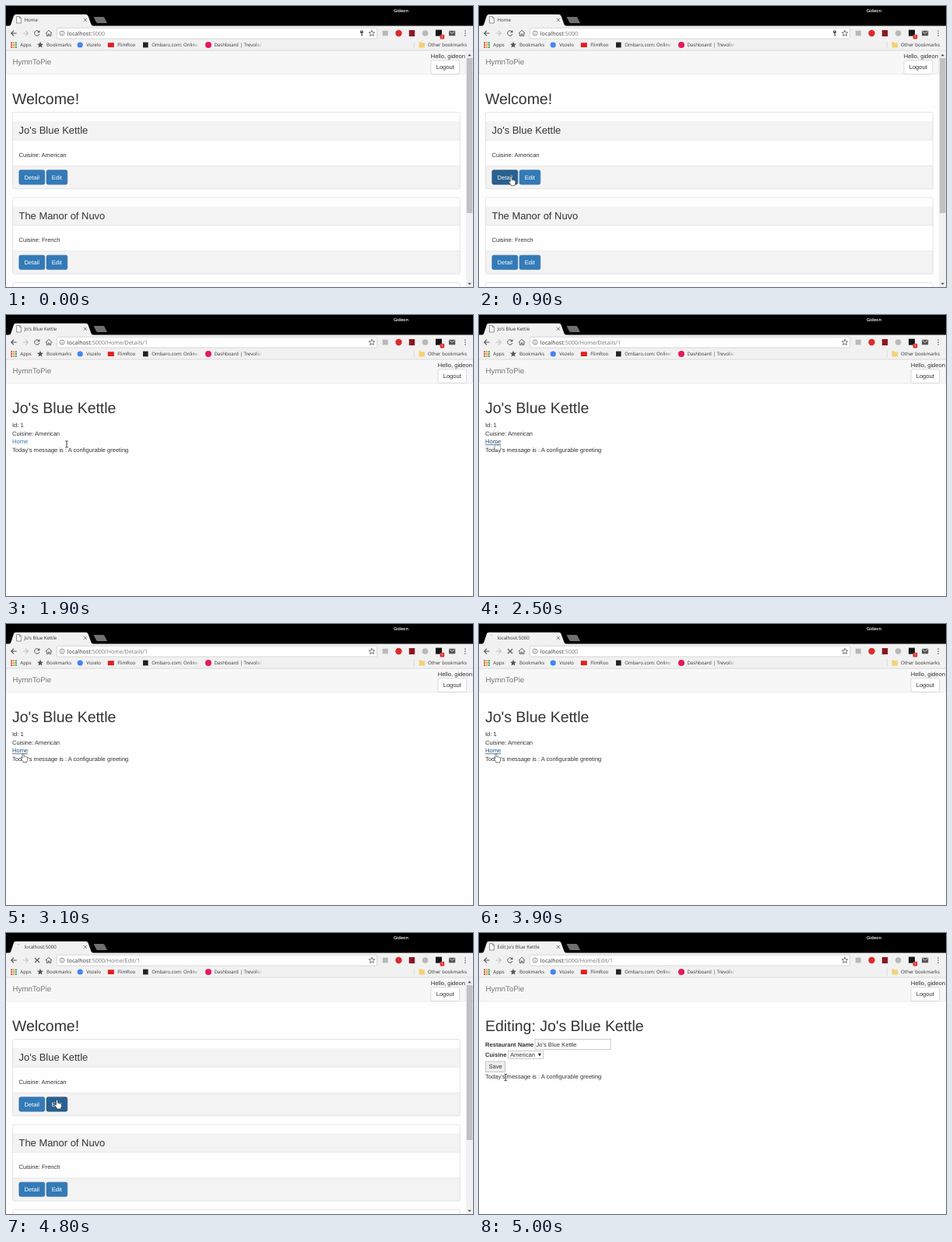
Recreate the animation shown at these times as an HTML page. Size 600 by 361 pixels, loop 5.1 s.

```html
<!DOCTYPE html>
<html lang="en">
<head>
<meta charset="utf-8">
<title>Restaurant list</title>
<style>
  html, body { margin: 0; width: 100%; height: 100%; overflow: hidden; background: #fefefe; }
  svg { display: block; width: 600px; height: 361px; text-rendering: geometricPrecision; }
  text { font-family: "Liberation Sans", Arial, sans-serif; font-size: 7.58px; fill: #333; }
  .ui { font-family: "Open Sans", "Noto Sans", sans-serif; font-size: 6.12px; fill: #333; }
  .url { font-size: 7.16px; }
  .user { font-size: 5.5px; font-weight: 600; fill: #fff; }
  .badge { font-size: 4.6px; fill: #fff; }
  .h1 { font-size: 19.45px; }
  .h3 { font-size: 12.95px; }
  .brand { font-size: 9.72px; fill: #777; }
  .bold { font-weight: bold; }
  .btn rect { fill: #337ab7; stroke: #2e6da4; stroke-width: .6; }
  .btn text { fill: #fff; }
  .btn.on rect { fill: #286090; stroke: #204d74; }
  .link { fill: #337ab7; }
  .link.on { fill: #23527c; text-decoration: underline; }
</style>
</head>
<body>
<svg id="stage" viewBox="0 0 600 361"></svg>
<script>
const LOOP = 5100, TICK = 100;
const PLACE = "Jo's Blue Kettle";
const BAR = "#f2f1f2", SOFT = "#f4f3f4";
const stage = document.getElementById("stage");

function add(parent, tag, attrs = {}, content) {
  const el = document.createElementNS("http://www.w3.org/2000/svg", tag);
  for (const key in attrs) el.setAttribute(key, attrs[key]);
  if (content !== undefined) el.textContent = content;
  return parent.appendChild(el);
}
const group = (parent, cls = "") => add(parent, "g", { class: cls });
const label = (p, x, y, str, cls = "") => add(p, "text", { x, y, class: cls }, str);
const box = (p, x, y, width, height, fill, more = {}) =>
  add(p, "rect", { x, y, width, height, fill, ...more });
const dot = (p, cx, cy, r, fill) => add(p, "circle", { cx, cy, r, fill });
const shape = (p, d, fill, more = {}) => add(p, "path", { d, fill, ...more });
const line = (p, d, stroke = "#555", width = 1) =>
  shape(p, d, "none", { stroke, "stroke-width": width });
const show = (el, on) => el.setAttribute("display", on ? "inline" : "none");

function star(p, cx, cy, size, fill, more = {}) {
  const points = Array.from({ length: 10 }, (_, i) => {
    const r = i % 2 ? size * .45 : size, a = Math.PI * (i / 5 - .5);
    return `${cx + r * Math.cos(a)},${cy + r * Math.sin(a)}`;
  }).join(" ");
  return add(p, "polygon", { points, fill, ...more });
}

function button(p, x, y, w, str) {
  const g = group(p, "btn");
  box(g, x, y, w, 18.4, "", { rx: 2 });
  label(g, x + 6.8, y + 12, str);
  return g;
}

// Page area
const pages = { home: group(stage), details: group(stage), edit: group(stage) };

function navbar(p, right) {
  box(p, 0, 56, 600, 305, "#fefefe");
  box(p, .3, 57.3, right - .6, 30.4, "#f8f7f8", { rx: 2, stroke: "#e2e2e2", "stroke-width": .6 });
  label(p, 8.5, 75.2, "HymnToPie", "brand");
  label(p, right - 45.3, 66.6, "Hello, gideon");
  box(p, right - 45, 69.7, 36.6, 17.7, "#fff", { rx: 2, stroke: "#ccc", "stroke-width": .7 });
  label(p, right - 38.3, 81.1, "Logout");
}

function panel(p, y, name, cuisine) {
  box(p, 8.6, y, 574.6, 98.2, "#fefefe", { rx: 2 });
  box(p, 8.6, y + 11.5, 574.6, 24.2, SOFT);
  box(p, 8.6, y + 68.8, 574.6, 29.4, SOFT, { rx: 2 });
  line(p, `M8.6 ${y + 35.7}H583.2M8.6 ${y + 68.8}H583.2`, "#ddd", .6);
  box(p, 8.6, y, 574.6, 98.2, "none", { rx: 2, stroke: "#d9d9d9", "stroke-width": .7 });
  label(p, 16.5, y + 27.7, name, "h3");
  label(p, 16.5, y + 57.4, "Cuisine: " + cuisine);
  return [button(p, 16.8, y + 74.2, 33, "Detail"), button(p, 52, y + 74.2, 26.8, "Edit")];
}

navbar(pages.home, 591);
label(pages.home, 8, 126, "Welcome!", "h1");
const [detailBtn, editBtn] = panel(pages.home, 136.6, PLACE, "American");
panel(pages.home, 246, "The Manor of Nuvo", "French");
panel(pages.home, 355.4, "", "");
box(pages.home, 591, 57.5, 9, 303.5, "#f1f1f1");
box(pages.home, 591.8, 67, 7.6, 199, "#c1c1c1");
shape(pages.home, "M593.3 64.3h4.6l-2.3-2.6z", "#555");
shape(pages.home, "M593.3 355.7h4.6l-2.3 2.6z", "#555");

const MESSAGE = "Today's message is : A configurable greeting";
navbar(pages.details, 600);
label(pages.details, 8, 126, PLACE, "h1");
label(pages.details, 8, 144, "Id: 1");
label(pages.details, 8, 154.6, "Cuisine: American");
const homeLink = label(pages.details, 8, 165.4, "Home", "link");
label(pages.details, 8, 176.1, MESSAGE);

const form = pages.edit;
const field = { stroke: "#b4b4b4", "stroke-width": .7 };
navbar(form, 600);
label(form, 8, 126, "Editing: " + PLACE, "h1");
label(form, 8, 145.5, "Restaurant Name", "bold");
box(form, 72, 136.3, 97, 13.3, "#fff", field);
label(form, 73.5, 145.6, PLACE);
label(form, 8, 159, "Cuisine", "bold");
box(form, 37.4, 151.6, 45.2, 9.7, "#fff", field);
label(form, 40, 159.1, "American");
shape(form, "M75.8 154.8h4.2l-2.1 3.6z", "#222");
box(form, 8.4, 165, 25.2, 13.4, "#eee", field);
label(form, 12.4, 174.4, "Save");
label(form, 8, 186.5, MESSAGE);

// Browser frame
const frame = group(stage);
box(frame, 0, 0, 600, 26, "#000");
label(frame, 498, 8.2, "Gideon", "ui user");
box(frame, 0, 25.5, 600, 31.5, BAR);
shape(frame, "M3 26Q5.5 26 6.5 23L9.7 13.2Q10.5 10.7 12.7 10.7H102.5Q104.8 10.7 105.7 13.2L109.2 23Q110.2 26 113 26Z", BAR);
shape(frame, "M112.5 14H124.5Q126 14 126.6 15.3L130 22H118Q116.5 22 115.8 20.5Z", "#707070");
line(frame, "M0 57H600", "#d4d4d4", .7);
line(frame, "M99.8 15.8l4 4m0-4l-4 4", "#555", .8);
const tabTitle = label(frame, 23.5, 20.1, "", "ui");
const pageIcon = shape(frame, "M13.6 13.4h3.6l2.2 2.2v6.4h-5.8zM17.2 13.4v2.2h2.2", "#fff",
  { stroke: "#666", "stroke-width": .7 });
const spinner = dot(frame, 16, 14.6, .6, "#888");

line(frame, "M13.6 35H6.8M10 31.7L6.7 35l3.3 3.3", "#555", 1.1);
line(frame, "M21.5 35h6.8M25.1 31.7l3.3 3.3-3.3 3.3", "#c4c4c4", 1.1);
const reload = group(frame);
line(reload, "M42.4 33A3.2 3.2 0 1 0 42.9 36", "#555", 1);
shape(reload, "M43.4 31v3.3h-3.3z", "#555");
const stop = line(frame, "M37 32l6 6m0-6l-6 6", "#555", 1.1);
line(frame, "M50.8 35.2L55 31.3l4.2 3.9M52.3 34.5V38.4h2v-2.4h1.5v2.4h2v-3.9", "#555", .9);

box(frame, 65.3, 28.2, 411.4, 13.8, "#fff", { rx: 1.6, stroke: "#c8c8c8", "stroke-width": .7 });
add(frame, "circle", { cx: 72, cy: 35, r: 3, fill: "none", stroke: "#666", "stroke-width": .7 });
line(frame, "M72 34.5v2.2M72 33.1v.8", "#666", .8);
const url = label(frame, 78.8, 37.6, "", "ui url");
add(url, "tspan", {}, "localhost");
add(url, "tspan", { fill: "#777" }, ":5000");
const path = add(url, "tspan", { fill: "#777" });
const key = group(frame);
dot(key, 457, 33.2, 2, "#444");
dot(key, 457, 32.7, .6, "#fff");
line(key, "M457 34.5v4M457 37.3h1.5", "#444", 1);
star(frame, 470, 35.2, 4, "#fff", { stroke: "#555", "stroke-width": .8 });

// Toolbar buttons
box(frame, 483.8, 31.7, 7, 6.6, "#b9b9b9");
dot(frame, 504.5, 35, 4.2, "#dc2b2b");
box(frame, 517.8, 31, 7.4, 8, "#8b1722");
dot(frame, 538.6, 35, 3.8, "#b9b9b9");
box(frame, 552, 30.6, 8, 8, "#161616");
box(frame, 557.6, 36.8, 5.6, 5.6, "#d93636", { rx: .8 });
label(frame, 559.2, 41.4, "1", "ui badge");
box(frame, 569, 31.7, 8.2, 6.5, "#555", { rx: .6 });
line(frame, "M569.6 32.6l3.5 2.7 3.5-2.7", BAR, .8);
[32, 35, 38].forEach(y => dot(frame, 590, y, .8, "#555"));

// Bookmarks
const gridColors = ["#d9473a", "#e0a92e", "#3d9b58", "#4479c4"];
for (let i = 0; i < 9; i++) {
  const col = i % 3, row = Math.floor(i / 3);
  box(frame, 6.2 + col * 2.8, 46.3 + row * 2.8, 2, 2, gridColors[(i + row) % 4]);
}
label(frame, 18.3, 52.2, "Apps", "ui");
star(frame, 44, 50, 4.2, "#555");
label(frame, 52, 52.2, "Bookmarks", "ui");
dot(frame, 95.2, 50, 3.6, "#4285f4");
label(frame, 103.2, 52.2, "Vozelo", "ui");
box(frame, 130.8, 47.2, 8, 5.8, "#e02020");
label(frame, 143.2, 52.2, "FlimRoo", "ui");
box(frame, 176, 46.6, 6.6, 6.8, "#222");
dot(frame, 260, 50, 4, "#e5185f");

const defs = add(stage, "defs");
const fade = add(defs, "linearGradient", { id: "fade" });
add(fade, "stop", { offset: 0, "stop-color": BAR, "stop-opacity": 0 });
add(fade, "stop", { offset: 1, "stop-color": BAR });
const clip = add(defs, "clipPath", { id: "marks" });
box(clip, 187, 44, 60.5, 12);
box(clip, 267, 44, 61.5, 12);
const longMarks = add(frame, "g", { "clip-path": "url(#marks)" });
label(longMarks, 187.2, 52.2, "Ombaro.com: Online", "ui");
label(longMarks, 267.4, 52.2, "Dashboard | Trevolisk", "ui");
[240, 321].forEach(x => box(frame, x, 45, 8, 11, "url(#fade)"));
line(frame, "M524.3 45.5v9", "#ccc", .6);
shape(frame, "M530.5 46.3h2.7l.8 1h4v6.2h-7.5z", "#f3d272");
label(frame, 542, 52.2, "Other bookmarks", "ui");

// Pointers, each drawn from its hot spot
const edge = { stroke: "#333", "stroke-width": .65, "stroke-linejoin": "round" };
const pointers = { arrow: group(stage), hand: group(stage), beam: group(stage) };
shape(pointers.arrow, "M0 0V9.4L2.2 7.4 3.7 10.7 5.1 10.1 3.7 6.9H6.7Z", "#fff", edge);
shape(pointers.hand, "M-1 1Q0-.7 1 1V4.4Q2 3.6 2.7 4.6 3.7 4 4.3 5 5.6 4.6 5.7 6V8.4Q5.6 9.8 4.8 10.4V11.6H-.1V10.6Q-1.7 8.8-3.1 6.5-2.8 5.1-1 6.7Z", "#fff", edge);
line(pointers.beam, "M-1.7-4.2Q0-4.4 0-3.4V3.4Q0 4.4-1.7 4.2M1.7-4.2Q0-4.4 0-3.4M0 3.4Q0 4.4 1.7 4.2", "#222", .9);

// time, x, y, pointer, opacity
const moves = [
  [0, 190, 310, "none", 1],
  [100, 190, 310, "arrow", 1],
  [600, 44, 221, "hand", 1],
  [700, 41, 219, "hand", 1],
  [1200, 41.4, 219.4, "hand", .75],
  [1400, 41.4, 219.4, "arrow", .75],
  [1600, 78, 166, "beam", 1],
  [2200, 78, 166, "beam", 1],
  [2500, 22, 163, "hand", .5],
  [2700, 22, 165, "hand", 1],
  [3300, 22, 166.4, "hand", 1],
  [4100, 22, 166.4, "arrow", 1],
  [4300, 58, 212, "hand", 1],
  [4400, 65.5, 214.4, "hand", 1],
  [4800, 65.5, 214.4, "hand", 1],
  [4900, 48, 198, "arrow", 1],
  [5000, 34.2, 185.5, "beam", 1]
];

// time, page, tab title, path, loading
const visits = [
  [0, "home", "Home", "", false],
  [1100, "home", "localhost:5000", "/Home/Details/1", true],
  [1200, "details", PLACE, "/Home/Details/1", false],
  [3600, "details", "localhost:5000", "", true],
  [4000, "home", "Home", "", false],
  [4800, "home", "localhost:5000", "/Home/Edit/1", true],
  [4900, "edit", "Edit " + PLACE, "/Home/Edit/1", false]
];

const lastIndex = (rows, t) => rows.findLastIndex(row => row[0] <= t);
const within = (t, from, to) => t >= from && t < to;

function draw(t) {
  const [, page, title, route, loading] = visits[lastIndex(visits, t)];
  for (const name in pages) show(pages[name], name === page);
  tabTitle.textContent = title;
  path.textContent = route;
  show(pageIcon, !loading);
  show(reload, !loading);
  show(spinner, loading);
  show(stop, loading);
  show(key, t < 1100);
  detailBtn.classList.toggle("on", within(t, 600, 1200));
  editBtn.classList.toggle("on", within(t, 4300, 4900));
  homeLink.classList.toggle("on", within(t, 2500, 4000));

  const i = lastIndex(moves, t);
  const a = moves[i], b = moves[i + 1] || a;
  const k = b === a ? 0 : (t - a[0]) / (b[0] - a[0]);
  const x = a[1] + (b[1] - a[1]) * k, y = a[2] + (b[2] - a[2]) * k;
  for (const name in pointers) {
    show(pointers[name], name === a[3]);
    pointers[name].setAttribute("transform", `translate(${x} ${y})`);
    pointers[name].setAttribute("opacity", a[4]);
  }
}

const start = performance.now();
function tick() {
  const t = (performance.now() - start) % LOOP;
  draw(Math.floor(t / TICK) * TICK);
  requestAnimationFrame(tick);
}
tick();
</script>
</body>
</html>
```
